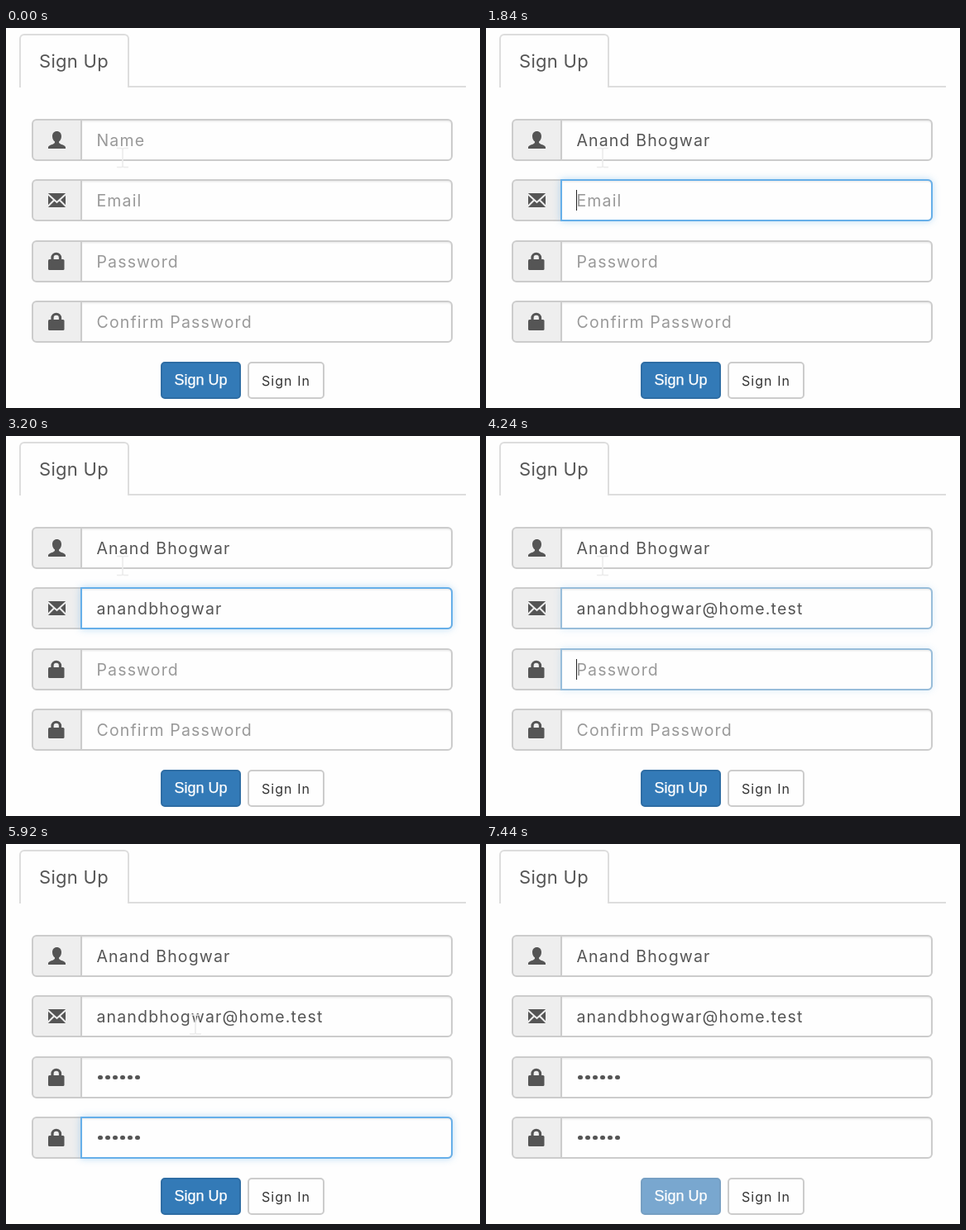
Animation of 573 by 460 pixels, one loop 7600 ms. Source, as an HTML page:

```html
<!DOCTYPE html>
<html lang="en">
<head>
<meta charset="utf-8">
<title>Sign Up</title>
<style>
  html, body { margin: 0; width: 100%; height: 100%; overflow: hidden; background: #fefefe; }
  body { position: relative; font: 19.5px Inter, "Noto Sans", sans-serif; color: #555; }
  * { box-sizing: border-box; }
  div, svg { position: absolute; white-space: pre; }
  #form, #beam, #arrow { left: 0; top: 0; overflow: visible; }
  .rule { left: 16px; top: 70px; width: 540px; height: 2px; background: #ddd; }
  .tab { left: 16px; top: 7px; width: 133px; height: 65px; padding-left: 22px;
    border: 2px solid #ddd; border-bottom: 0; border-radius: 6px 6px 0 0; background: #fefefe;
    font-size: 22px; letter-spacing: .3px; line-height: 63px; }
  .row { left: 31px; width: 509px; height: 51px; }
  .addon { left: 0; top: 0; width: 61px; height: 51px; background: #eee;
    border: 2px solid #ccc; border-radius: 6px 0 0 6px; }
  .icon { left: 20px; fill: #555; overflow: visible; }
  .field, .glow { left: 59px; top: 0; width: 450px; height: 51px; border-radius: 0 6px 6px 0; }
  .field { background: #fefefe; border: 2px solid #ccc; box-shadow: inset 0 1.5px 1.5px rgba(0,0,0,.075); }
  .glow { border: 2px solid #66afe9; box-shadow: 0 0 9px rgba(102,175,233,.45); }
  .text { left: 78.5px; top: 0; height: 51px; line-height: 52px; letter-spacing: 1.15px; }
  .empty { color: #999; }
  .dot { display: inline-block; width: 5.4px; height: 5.4px; margin: 0 1.8px 4.5px;
    border-radius: 50%; background: #555; vertical-align: middle; }
  .caret { top: 13px; width: 1px; height: 25px; background: #222; }
  .btn { top: 404px; height: 45px; border: 2px solid #ccc; border-radius: 5px;
    line-height: 43px; text-align: center; }
  #up { left: 187px; width: 97px; color: #fff; background: #337ab7; border-color: #2e6da4;
    font: 18px/41px "Liberation Sans", Arial, sans-serif; -webkit-text-stroke: .25px; }
  #up.hover { background: #286090; border-color: #204d74; }
  .in { left: 292px; width: 93px; color: #333; font-size: 16px; letter-spacing: 1.05px; }
</style>
</head>
<body>
<div class="rule"></div>
<div class="tab">Sign Up</div>
<div id="form"></div>
<div class="btn" id="up">Sign Up</div>
<div class="btn in">Sign In</div>
<svg id="beam" width="1" height="1">
  <path d="M-7-11.500H-2Q0-11.500 0-9.500Q0-11.500 2-11.500H7M0-10V10M-7 11.500H-2Q0 11.500 0 9.500Q0 11.500 2 11.500H7"
    fill="none" stroke="#ececec" stroke-width="1.6"/>
</svg>
<svg id="arrow" width="1" height="1">
  <path d="M0 0V22.500L5.300 17.600L9 26L13 24.200L9.300 16.200H16.500Z"
    fill="#fff" stroke="#111" stroke-width="1.3" stroke-linejoin="round"/>
</svg>
<script>
const LOOP = 7600, STEP = 80, FADE = 160, BLINK = 140;
const MOVE = 5760, HOVER = 6400, CLICK = 7040, LEAVE = 7440;
const $ = id => document.getElementById(id);

const lock = '<rect y="8" width="19.500" height="13" rx="1.500"/>' +
  '<path d="M5 9V6A4.750 4.750 0 0 1 14.500 6V9" fill="none" stroke="#555" stroke-width="3.200"/>';
const user = '<path d="M10.500 0C7 0 5 2.600 5 6c0 3 1.400 5.400 3 6.600c.3 1.600-.5 2.200-2 2.800' +
  'C3 16.500 0 17.500 0 19.500V21H21V19.500C21 17.500 18 16.500 15 15.400c-1.500-.6-2.300-1.200-2-2.800' +
  'C14.600 11.400 16 9 16 6C16 2.600 14 0 10.500 0z"/>';
const mail = '<rect width="21" height="17"/><path d="M-.5 1L10.500 11L21.500 1M-.5 16L7 8.500M21.500 16L14 8.500"' +
  ' fill="none" stroke="#eee" stroke-width="2"/>';

// bursts: a piece of text and the time its first key lands
const rows = [
  { hint: 'Name', icon: user, from: 160, bursts: [['Anand', 480], [' ', 1120], ['Bhogwar', 1280]] },
  { hint: 'Email', icon: mail, from: 1760,
    bursts: [['anandb', 2240], ['hogwar', 2720], ['@', 3280], ['home', 3440], ['.test', 3760]] },
  { hint: 'Password', icon: lock, from: 4240, bursts: [['••••••', 4560]] },
  { hint: 'Confirm Password', icon: lock, from: 5040, bursts: [['••••••', 5360]] }
];

const clamp = v => Math.min(1, Math.max(0, v));
const fade = (t, from) => t < from ? 0 : clamp(.5 + (t - from) / FADE);

rows.forEach((r, i) => {
  r.y = Math.round(110 + i * 73.4);
  r.until = i < 3 ? rows[i + 1].from : CLICK;
  const el = document.createElement('div');
  el.className = 'row';
  el.style.top = r.y + 'px';
  el.innerHTML = `<div class="addon"></div>
    <svg class="icon" style="top:${r.icon === mail ? 17 : 15}px" width="21" height="21">${r.icon}</svg>
    <div class="field"></div><div class="glow"></div><div class="text"></div><div class="caret"></div>`;
  $('form').append(el);
  for (const c of ['glow', 'text', 'caret']) r[c] = el.querySelector('.' + c);
});

// Text typed by time t and the time of the latest key; long bursts squeeze into five steps
function typed(r, t) {
  let text = '', last = r.from;
  for (const [part, start] of r.bursts) {
    if (t < start) break;
    const steps = Math.min(5, part.length);
    const done = Math.min(steps, Math.floor((t - start) / STEP) + 1);
    text += part.slice(0, Math.floor(part.length * done / steps));
    last = start + (done - 1) * STEP;
  }
  return [text, last];
}

function drawRow(r, t) {
  const [text, last] = typed(r, t);
  if (r.shown !== text) {
    r.shown = text;
    r.text.classList.toggle('empty', !text);
    if (text[0] === '•') r.text.innerHTML = '<span class="dot"></span>'.repeat(text.length);
    else r.text.textContent = text || r.hint;
  }
  r.glow.style.opacity = fade(t, r.from) - fade(t, r.until);
  const on = t >= r.from && t < r.until && Math.floor((t - last) / BLINK) % 2 === 0;
  r.caret.style.visibility = on ? 'visible' : 'hidden';
  const width = text ? r.text.getBoundingClientRect().width : 0;
  r.caret.style.left = Math.round(78 + Math.max(0, width - 1)) + 'px';
}

function draw(time) {
  const t = Math.floor(time / STEP) * STEP;
  rows.forEach(r => drawRow(r, t));

  $('up').classList.toggle('hover', t >= HOVER && t < CLICK);
  $('up').style.opacity = 1 - .35 * fade(t, CLICK);

  // The pointer swings right at once, then drops to the button
  const left = 1 - clamp((t - MOVE) / 800);
  const x = 233 - 92 * left ** 14, y = 419 - 262 * left ** 1.2;
  const inField = rows.some(r => y >= r.y && y <= r.y + 51);
  const show = (id, on) => {
    $(id).style.visibility = on ? 'visible' : 'hidden';
    $(id).style.transform = `translate(${x}px, ${y}px)`;
  };
  show('beam', inField);
  show('arrow', !inField && t < LEAVE);
}

const start = performance.now();
function tick() {
  draw((performance.now() - start) % LOOP);
  requestAnimationFrame(tick);
}
tick();
</script>
</body>
</html>
```
